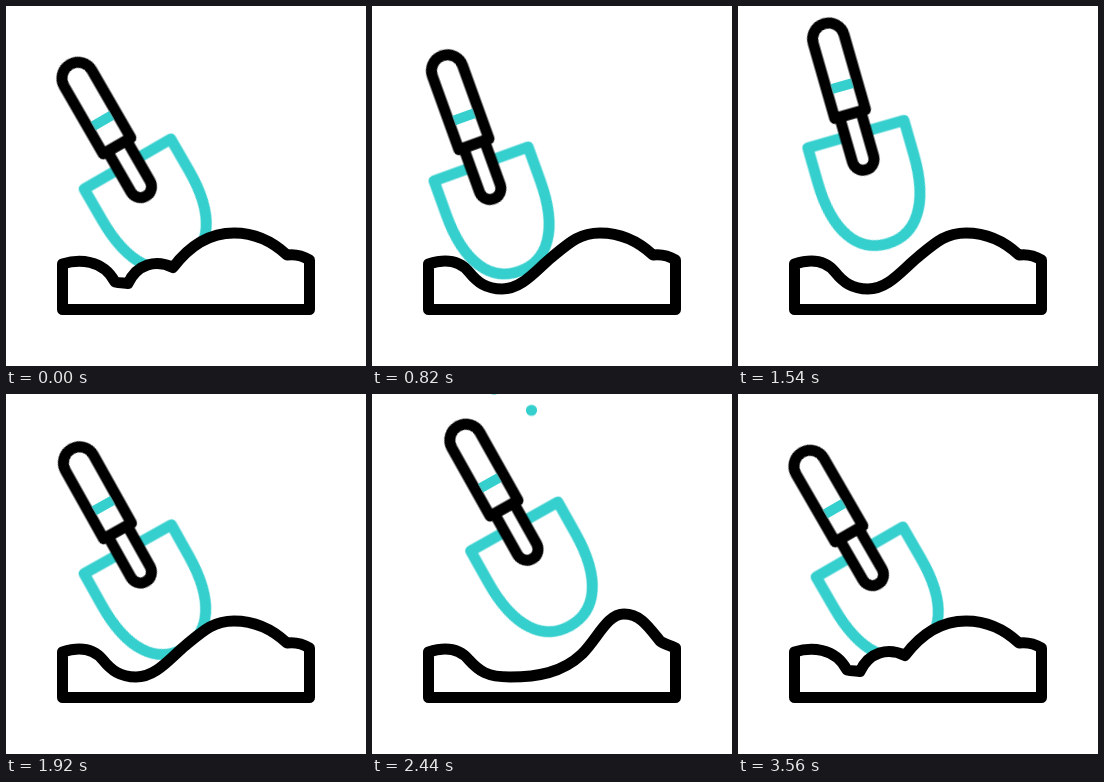
Animation, 360 px wide and 360 px high, one loop 3.58 s. Source, as an HTML page:

```html
<!DOCTYPE html>
<html lang="en">
<head>
<meta charset="utf-8">
<title>Digging trowel</title>
<style>
  html, body { margin: 0; width: 100%; height: 100%; overflow: hidden; background: #fff; }
  svg { display: block; width: 100vw; height: 100vh; }

  path { fill: #fff; stroke: #000; stroke-width: 11; stroke-linejoin: round; stroke-linecap: round; }
  .teal { stroke: #35cfce; }
  .band { stroke-width: 10; stroke-linecap: butt; }
  circle { fill: #35cfce; }

  .trowel { animation: dig 3580ms linear infinite; }
  .ground { animation: morph 3580ms ease-in-out infinite; }
  .crumb {
    transform: translate(0, -20px);
    animation: fall 3580ms var(--at) infinite;
  }

  @keyframes dig {
    0%, 5.59% { transform: translate(121.5px, 158px) rotate(-30deg); animation-timing-function: ease-in-out; }
    12.57%    { transform: translate(150px, 127px) rotate(-36deg); animation-timing-function: ease-in; }
    16.76%    { transform: translate(118px, 137px) rotate(-16deg); animation-timing-function: ease-out; }
    20.67%    { transform: translate(99px, 157px) rotate(-14deg); }
    22.91%    { transform: translate(109px, 158px) rotate(-19.8deg); }
    35.2%     { transform: translate(150.5px, 127px) rotate(-36.5deg); }
    36.31%    { transform: translate(152px, 125.5px) rotate(-37deg); animation-timing-function: ease-in; }
    43.02%    { transform: translate(118px, 128px) rotate(-16deg); animation-timing-function: ease-out; }
    50.7%     { transform: translate(99.5px, 157px) rotate(-14deg); }
    53.63%    { transform: translate(121.7px, 155.3px) rotate(-29.2deg); }
    64.8%     { transform: translate(150px, 127px) rotate(-36deg); animation-timing-function: ease-in; }
    68.16%    { transform: translate(142.5px, 132.5px) rotate(-29.4deg); animation-timing-function: ease-out; }
    79.89%    { transform: translate(83.5px, 132.3px) rotate(.5deg); }
    81.01%, 94.41% { transform: translate(83.2px, 132.3px) rotate(.7deg); animation-timing-function: ease-in-out; }
    99.44%, 100% { transform: translate(121.5px, 158px) rotate(-30deg); }
  }

  /* Heaped soil, first scoop, second scoop, and back. */
  @keyframes morph {
    0%, 8%, 99.44%, 100% {
      d: path("M56.5 303.5L56.5 258C72 253 97 253 109 276C113 277 118 277 122 277.5C131 258 150 253 167 261.5C184 239 205 227 228 227C248 227 266 235 281 249C289 248 297 250 303.5 254L303.5 303.5Z");
    }
    20.67%, 54.2% {
      d: path("M56.5 303.5L56.5 258C72 253 87 254 97 266C105 276 114 283 130 283C150 283 163 265 180 251C198 236 208 227 228 227C248 227 266 235 281 249C289 248 297 250 303.5 254L303.5 303.5Z");
    }
    65.3%, 94.41% {
      d: path("M56.5 303.5L56.5 258C72 253 87 254 97 266C107 277 115 283 138 283C165 283 190 279 210 260C226 244 235 220 252 220C268 220 276 232 288 247C292 250 297 251 303.5 254L303.5 303.5Z");
    }
  }

  /* Constant acceleration; crumbs end hidden behind the soil. */
  @keyframes fall {
    0% { transform: translate(0, -6px); animation-timing-function: cubic-bezier(.3333, .0894, .6667, .4227); }
    15.64%, 100% { transform: translate(var(--dx, 0px), 303px); }
  }
</style>
</head>
<body>
<svg viewBox="0 0 360 360">
  <g class="trowel">
    <path class="teal" d="M-50 0V36C-50 88-30 114 0 114C30 114 50 88 50 36V0Z"/>
    <path d="M-11-21V26A11 11 0 0 0 11 26V-21Z"/>
    <path d="M-16-21V-99A16 16 0 0 1 16-99V-21Z"/>
    <path class="teal band" d="M-10.5-50H10.5"/>
  </g>
  <circle class="crumb" cx="159.5" r="5.6" style="--at: 2340ms"/>
  <circle class="crumb" cx="122" r="5.6" style="--at: 2434ms; --dx: 11px"/>
  <circle class="crumb" cx="188.7" r="5.6" style="--at: 2571ms"/>
  <path class="ground" d="M56.5 303.5L56.5 258C72 253 97 253 109 276C113 277 118 277 122 277.5C131 258 150 253 167 261.5C184 239 205 227 228 227C248 227 266 235 281 249C289 248 297 250 303.5 254L303.5 303.5Z"/>
</svg>
</body>
</html>
```
